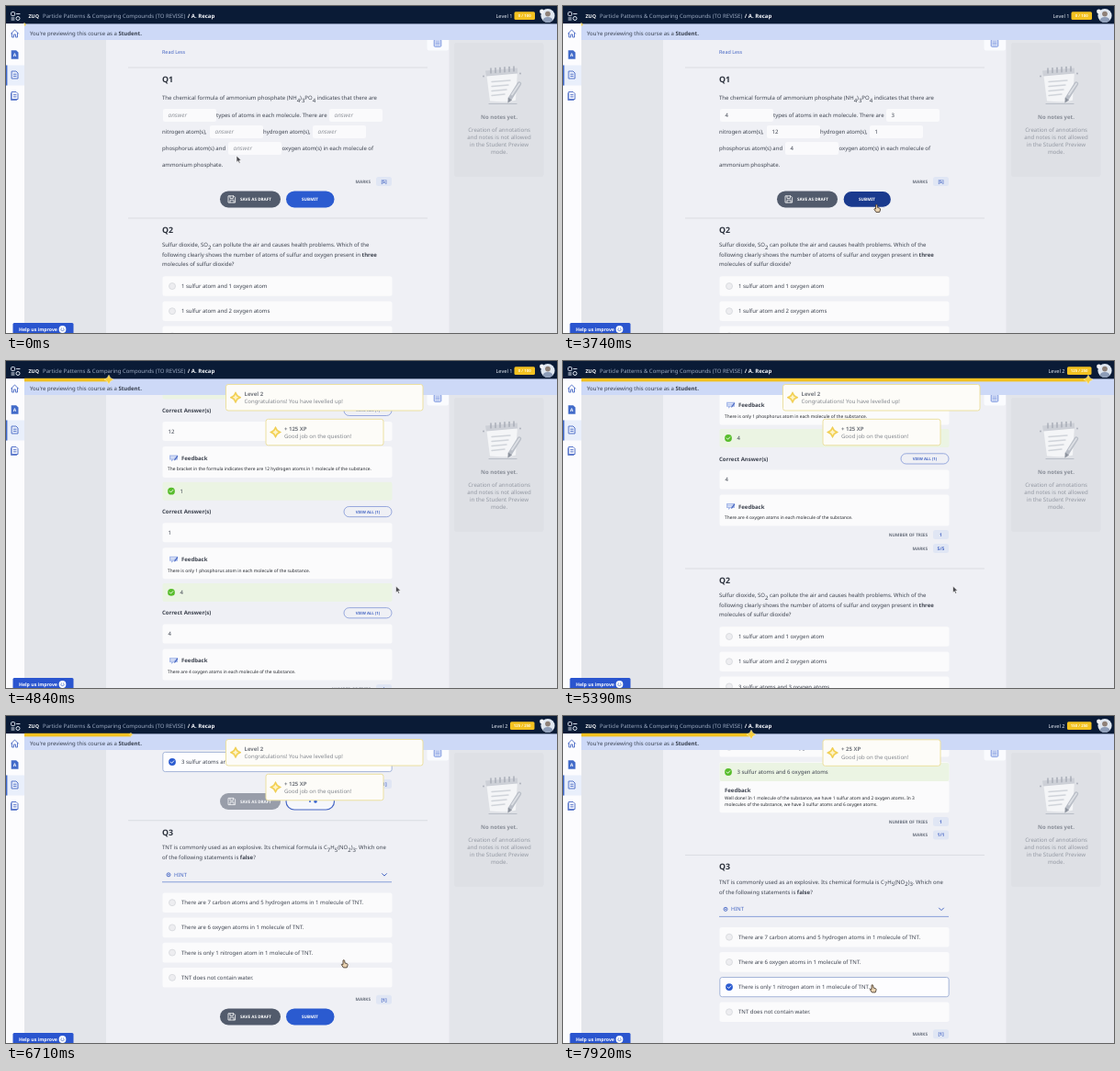
Write an HTML page that moves like this. It is 600 by 356 pixels and loops after 8 s.

```html
<!DOCTYPE html>
<html lang="en">
<head>
<meta charset="utf-8">
<title>Course preview</title>
<style>
html, body { margin: 0; width: 100%; height: 100%; overflow: hidden; background: #e3e5ea; }
svg { display: block; width: 600px; height: 356px; }
text { font-family: "Noto Sans", "Open Sans", sans-serif; text-rendering: geometricPrecision; }
</style>
</head>
<body>
<svg id="stage" viewBox="0 0 600 356" xmlns="http://www.w3.org/2000/svg"></svg>
<script>
const LOOP = 8000, STEP = 110;
const INK = '#3d434f', BLUE = '#2b5bd0', LINK = '#4767c4', GOLD = '#f3c120', PAPER = '#eff0f5';
const stage = document.getElementById('stage');

// ---- drawing helpers: y is the middle of the capitals ----
function markup(s) {
  return s.replace(/&/g, '&amp;')
    .replace(/\*\*(.+?)\*\*/g, '<tspan font-weight="700">$1</tspan>')
    .replace(/_(\d)([^_]*)/g, '<tspan dy="2.4">$1</tspan><tspan dy="-2.4">$2</tspan>');
}
function text(x, y, s, { size = 6, fill = INK, bold, italic, anchor, id } = {}) {
  return `<text x="${x}" y="${(y + size * 0.35).toFixed(2)}" font-size="${size}" fill="${fill}"` +
    (bold ? ' font-weight="700"' : '') + (italic ? ' font-style="italic"' : '') +
    (anchor ? ` text-anchor="${anchor}"` : '') + (id ? ` id="${id}"` : '') + `>${markup(s)}</text>`;
}
const rect = (x, y, w, h, fill, rx = 0, extra = '') =>
  `<rect x="${x}" y="${y}" width="${w}" height="${h}" rx="${rx}" fill="${fill}" ${extra}/>`;
const circle = (x, y, r, fill, extra = '') =>
  `<circle cx="${x}" cy="${y}" r="${r}" fill="${fill}" ${extra}/>`;
const line = (d, stroke, w = 0.8, extra = '') =>
  `<path d="${d}" fill="none" stroke="${stroke}" stroke-width="${w}" stroke-linecap="round" stroke-linejoin="round" ${extra}/>`;
const shape = (d, fill, extra = '') => `<path d="${d}" fill="${fill}" ${extra}/>`;
const group = (id, body) => `<g id="${id}">${body}</g>`;
const at = (x, y, body) => `<g transform="translate(${x} ${y})">${body}</g>`;
const star = (r, fill, extra = '') => {
  const k = r * 0.36;
  return shape(`M0 ${-r}L${k} ${-k}L${r} 0L${k} ${k}L0 ${r}L${-k} ${k}L${-r} 0L${-k} ${-k}Z`, fill, extra);
};

// ---- question parts ----
const divider = y => rect(133, y - 0.4, 326, 0.8, '#d5d8dd');
const heading = (y, s) => text(170, y, s, { size: 8.8, bold: true, fill: '#2c323d' });
const card = (y, h) => rect(170.5, y, 250, h, '#fbfbfc', 2.5);

function score(y, label, value) {
  return text(397, y, label, { size: 4.7, bold: true, fill: '#6a717e', anchor: 'end' }) +
    rect(403, y - 5, 17, 10, '#e0e6f4', 2.5) +
    text(411.5, y, value, { size: 5, bold: true, fill: LINK, anchor: 'middle' });
}
function buttons(y, id) {
  const disk = line('M-3.6 -3.6H2L3.6 -2V3.6H-3.6ZM-2 -3.4V-1H1.4V-3.4M-2 3.4V.8H2V3.4', '#fff', 0.8);
  const dots = [0, 1, 2].map(i => circle(325 + i * 6, y, 1, BLUE, `class="${id}Dot"`)).join('');
  return group(id + 'Save', rect(233, y - 9, 66, 18, '#525b6c', 9) + at(246, y, disk) +
      text(255, y, 'SAVE AS DRAFT', { size: 4.6, bold: true, fill: '#fff' })) +
    rect(305, y - 9, 52.5, 18, BLUE, 9, `id="${id}Pill" stroke-width="1.2"`) +
    text(331, y, 'SUBMIT', { size: 4.6, bold: true, fill: '#fff', anchor: 'middle', id: id + 'Label' }) +
    group(id + 'Dots', dots);
}
function check(x, y, fill) {
  return circle(x, y, 3.9, fill) + line(`M${x - 1.7} ${y}l1.2 1.3l2.3 -2.5`, '#fff', 0.9);
}
function option(y, s, id) {
  const picked = id ? group(id, rect(170.8, y - 10.6, 249.4, 21.2, '#fdfdff', 2.5, 'stroke="#8fa3cf" stroke-width=".8"') +
    check(181, y, BLUE)) : '';
  return card(y - 10.8, 21.6) + circle(181, y, 3.5, '#ededf0', 'stroke="#d2d4d8" stroke-width=".7"') +
    picked + text(191, y, s);
}
const options = (y, list, ids = {}) => list.map((s, i) => option(y + 27.2 * i, s, ids[i])).join('');

// ---- question 1 ----
const blanks = [[171, 119, '4'], [352, 119, '3'], [222, 137, '12'], [334, 137, '1'], [242, 155, '4']];
function questionOne() {
  const copy = [
    [170, 100, 'The chemical formula of ammonium phosphate (NH_4)_3PO_4 indicates that there are'],
    [229, 119, 'types of atoms in each molecule. There are'],
    [170, 137, 'nitrogen atom(s),'], [280, 137, 'hydrogen atom(s),'],
    [170, 155, 'phosphorus atom(s) and'], [300.5, 155, 'oxygen atom(s) in each molecule of'],
    [170, 172.5, 'ammonium phosphate.']
  ];
  return text(170, 50, 'Read Less', { size: 5.4, fill: LINK }) + divider(67) + heading(80, 'Q1') +
    copy.map(c => text(...c)).join('') +
    blanks.map(([x, y], i) => rect(x, y - 7, 58, 14, '#fafafc', 2) +
      text(x + 5.5, y, 'answer', { size: 6.4, id: 'blank' + i })).join('') +
    rect(357.6, 115, 0.7, 8, '#333', 0, 'id="caret"');
}
const feedback = [
  'There are 4 types of atoms in each molecule of the substance.',
  'The bracket in the formula indicates there are 3 nitrogen atoms in 1 molecule of the substance.',
  'The bracket in the formula indicates there are 12 hydrogen atoms in 1 molecule of the substance.',
  'There is only 1 phosphorus atom in each molecule of the substance.',
  'There are 4 oxygen atoms in each molecule of the substance.'
];
const note = (y, s) => text(176, y, s, { size: 4.86, fill: '#24272d' });
const right = y => rect(170.5, y - 10, 250, 20, '#ebf4e3', 2) + check(180, y, '#58bd2c');
function resultRow(remark, i) {
  const answer = blanks[i][2];
  const bubble = shape('M-4.5 -3H4.5V2H0L-2.5 4V2H-4.5Z', '#a9bbea') +
    line('M-2.8 -1.2H2M-2.8 .4H.5', '#fff', 0.7) + line('M1.2 2.2L4.2 -1.8', '#4a68bf', 1.1);
  return at(0, 195 + 110.2 * i, right(0) + text(189.5, 0, answer) +
    text(170, 22.5, 'Correct Answer(s)', { bold: true }) +
    rect(368, 16.8, 52, 11.2, 'none', 5.6, 'stroke="#7088d2" stroke-width=".7"') +
    text(394, 22.4, 'VIEW ALL (1)', { size: 4.3, bold: true, fill: LINK, anchor: 'middle' }) +
    card(34.6, 21) + text(176.5, 45.2, answer) +
    card(61.6, 34) + at(182.5, 74, bubble) + text(191, 74.5, 'Feedback', { bold: true }) +
    note(86.2, remark));
}

// ---- questions 2 and 3, measured from their headings ----
const questionTwo = divider(-13) + heading(0, 'Q2') +
  text(170, 16, 'Sulfur dioxide, SO_2 can pollute the air and causes health problems. Which of the') +
  text(170, 26.4, 'following clearly shows the number of atoms of sulfur and oxygen present in **three**') +
  text(170, 36.8, 'molecules of sulfur dioxide?') +
  options(61, ['1 sulfur atom and 1 oxygen atom', '1 sulfur atom and 2 oxygen atoms',
    '3 sulfur atoms and 3 oxygen atoms', '3 sulfur atoms and 6 oxygen atoms'], { 3: 'pickTwo' }) +
  group('formTwo', score(166.6, 'MARKS', '[1]') + buttons(185.6, 'two')) +
  group('resultTwo', card(152, 34.8) + right(142.6) + text(189.5, 142.6, '3 sulfur atoms and 6 oxygen atoms') +
    text(176, 162.4, 'Feedback', { bold: true }) +
    note(171, 'Well done! In 1 molecule of the substance, we have 1 sulfur atom and 2 oxygen atoms. In 3') +
    note(177.6, 'molecules of the substance, we have 3 sulfur atoms and 6 oxygen atoms.') +
    score(196.6, 'NUMBER OF TRIES', '1') + score(211.2, 'MARKS', '1/1'));

const questionThree = divider(-13) + heading(0, 'Q3') +
  text(170, 16.5, 'TNT is commonly used as an explosive. Its chemical formula is C_7H_5(NO_2)_3. Which one') +
  text(170, 27.4, 'of the following statements is **false**?') +
  circle(177, 46, 2, 'none', `stroke="${LINK}" stroke-width=".9"`) + circle(177, 46, 0.8, LINK) +
  text(183, 46, 'HINT', { size: 5.8, fill: LINK }) + line('M409.5 44.8l2.5 2.5l2.5 -2.5', LINK, 1) +
  rect(170, 53.6, 250, 0.8, '#6f8bd2') +
  options(76.4, ['There are 7 carbon atoms and 5 hydrogen atoms in 1 molecule of TNT.',
    'There are 6 oxygen atoms in 1 molecule of TNT.',
    'There is only 1 nitrogen atom in 1 molecule of TNT.', 'TNT does not contain water.'], { 2: 'pickThree' }) +
  score(182, 'MARKS', '[1]') + buttons(200.6, 'three');

// ---- frame around the page ----
function notesCard() {
  const rings = [-12, -7, -2, 3, 8, 13];
  const pad = shape('M-17 -14L17 -17L15 16Q6 19 -13 17Z', '#f4f5f7') + shape('M-18 -16L17 -19L17 -13L-17 -10Z', '#cdd0d7') +
    rings.map(x => line(`M${x} ${-14.5 - x * 0.08}v-5`, '#a3a8b2', 1.3)).join('') +
    [0, 1, 2, 3].map(i => line(`M-11 ${-4 + i * 5}L${9 - i * 2} ${-5.5 + i * 5}`, '#d0d4da', 1.4)).join('') +
    line('M19 -2L9 14', '#b9bec7', 4.4) + line('M19 -2L11 10', '#dcdfe4', 1.8) + shape('M6.8 13L11 16L6.4 19Z', '#8d939e');
  const specks = circle(-20, -10, 0.9, '#a9aeb8') + circle(20, -13, 0.9, '#a9aeb8') +
    line('M-14 20H16', '#b9bec7', 1.2);
  const lines = ['Creation of annotations', 'and notes is not allowed', 'in the Student Preview', 'mode.'];
  return rect(488, 40, 97.5, 146, '#dee0e5', 3) + at(540, 86.5, specks + pad) +
    text(537, 121, 'No notes yet.', { bold: true, fill: '#8a8f99', anchor: 'middle' }) +
    lines.map((s, i) => text(537, 134.5 + 8 * i, s, { size: 6.1, fill: '#9499a3', anchor: 'middle' })).join('');
}
function sidebar() {
  const sheet = line('M-3 -4H1.5L3.5 -2V4H-3ZM-1.2 -.8H1.6M-1.2 1.4H1.6', LINK, 0.9);
  return rect(0, 19.2, 20, 337, '#fcfcfe') + rect(0, 64.5, 20, 22, '#e9effb') + rect(0, 64.5, 1.4, 22, '#3d66c8') +
    at(9.5, 30, line('M-4 0L0 -4L4 0M-3 -.6V4H-1V1H1V4H3V-.6', LINK, 0.9)) +
    at(9.5, 53, shape('M-3.8 -4.8H1.6L4 -2.4V4.8H-3.8Z', '#426bc9') +
      text(0, 0.6, 'A', { size: 5, bold: true, fill: '#fff', anchor: 'middle' })) +
    at(9.5, 75, sheet) + at(9.5, 97.5, line('M-4 -2.5V5H2', LINK, 0.8) + sheet) +
    rect(7.5, 345, 66, 13, '#2a55cf', 1.5) + text(14, 352, 'Help us improve', { size: 5.2, bold: true, fill: '#fff' }) +
    at(61.5, 352, circle(0, 0, 3.9, '#fff') + circle(-1.3, -1, 0.6, '#2450c2') + circle(1.3, -1, 0.6, '#2450c2') +
      line('M-1.9 .8Q0 2.8 1.9 .8', '#2450c2', 0.7));
}
function header() {
  return rect(20, 19, 580, 18, '#cdd9f7') + text(26, 30, "You're previewing this course as a **Student.**", { fill: '#38404f' }) +
    rect(0, 0, 600, 19.4, '#0a1b36') +
    rect(5.6, 6.6, 4, 4, 'none', 1, 'stroke="#dfe6f2" stroke-width="1"') +
    circle(13, 13.5, 2, 'none', 'stroke="#dfe6f2" stroke-width="1"') +
    line('M11.5 8.6H15M6 13H9M6 15H9', '#dfe6f2', 1) +
    text(24.5, 11.3, 'ZUQ', { size: 5.4, bold: true, fill: '#fff' }) +
    text(40, 10.8, 'Particle Patterns & Comparing Compounds (TO REVISE)', { fill: '#9caac1' }) +
    text(197.8, 10.8, '/ A. Recap', { bold: true, fill: '#f4f6fa' }) +
    text(552, 10.8, '', { size: 5.6, fill: '#dfe5ef', anchor: 'end', id: 'level' }) +
    rect(553, 6.3, 23, 8.8, GOLD, 1.5, 'id="xpBox"') +
    text(564.5, 10.7, '', { size: 4.3, bold: true, fill: '#fff6d8', anchor: 'middle', id: 'xp' }) +
    circle(590, 10.5, 7.6, '#dfe7f1') + circle(590, 8.6, 2.9, '#8e8178') +
    shape('M584.6 15.8Q585 12 590 12T595.4 15.8Q590 20.4 584.6 15.8Z', '#8d9db8') + circle(583.5, 6, 2.4, '#f2f4f8') +
    rect(20, 18.8, 0, 3.6, GOLD, 0, 'id="bar"') + group('barStar', star(5, '#f8cf3e', 'stroke="#fff3c0" stroke-width=".5"'));
}
function toast(id, x, y, w, title, body) {
  return group(id, rect(x, y, w, 28.5, '#fdfcf8', 2.5, 'stroke="#ece0a0" stroke-width="1"') +
    at(x + 10.5, y + 14.2, star(6, '#f5d250', 'stroke="#eac64a" stroke-width=".6"') + star(3.2, '#fdf3c8')) +
    text(x + 20, y + 10.3, title, { bold: true, fill: '#73777e' }) +
    text(x + 20, y + 18.6, body, { fill: '#84888f' }));
}
const cursors =
  group('arrow', shape('M0 0V7.2L1.7 5.7L2.9 8.3L4.1 7.7L3 5.2L5.2 5Z', '#4a4a4f', 'stroke="#fff" stroke-width=".6"')) +
  group('beam', line('M-1.5 -3.5H1.5M0 -3.5V3.5M-1.5 3.5H1.5', '#222', 0.8)) +
  group('hand', shape('M-1 -3.5Q0 -4.4 .7 -3.3L1 -.6L3.4 .1Q4.3 .6 4 2L3.2 4.4H-.6L-2.7 1.2Q-2.6 .1 -1 1Z',
    '#e9d3b2', 'stroke="#3a2c20" stroke-width=".8"'));

stage.innerHTML = rect(0, 0, 600, 356, '#e3e5ea') + rect(109, 21, 373.5, 335, PAPER) +
  group('page', questionOne() +
    group('formOne', score(191, 'MARKS', '[5]') + buttons(210.4, 'one')) +
    group('resultOne', feedback.map(resultRow).join('') +
      score(740.8, 'NUMBER OF TRIES', '1') + score(755.8, 'MARKS', '5/5')) +
    group('qTwo', questionTwo) + group('qThree', questionThree)) +
  notesCard() + rect(458.5, 32, 23.5, 16.5, '#fafbfe', 2.5) +
  at(470, 40.5, rect(-3.8, -3.8, 7.6, 7.6, '#dfe6f8', 1, 'stroke="#6d8bdc" stroke-width=".9"') +
    line('M-2 -1.6H2M-2 0H2M-2 1.6H2', '#7f99e0', 0.7)) +
  header() + sidebar() +
  toast('levelToast', 239.5, 25.5, 214.5, 'Level 2', 'Congratulations! You have levelled up!') +
  toast('xpToast', 283, 63.3, 128, '+ 125 XP', 'Good job on the question!') +
  toast('bonusToast', 283, 25.8, 128, '+ 25 XP', 'Good job on the question!') +
  group('cursor', cursors);

// ---- motion ----
const el = {};
stage.querySelectorAll('[id]').forEach(n => { el[n.id] = n; });
const set = (id, attrs) => { for (const k in attrs) el[id].setAttribute(k, attrs[k]); };
const show = (id, on) => set(id, { display: on ? 'inline' : 'none' });
const move = (id, x, y, s = 1) => set(id, { transform: `translate(${x} ${y}) scale(${s})` });
const ease = u => u * u * (3 - 2 * u);
const linear = u => u;

// keys are [time, value, value...]
function track(keys, t, curve = ease) {
  const i = keys.findIndex(k => k[0] > t);
  if (i < 0) return keys[keys.length - 1].slice(1);
  if (i === 0) return keys[0].slice(1);
  const a = keys[i - 1], b = keys[i], u = curve((t - a[0]) / (b[0] - a[0]));
  return a.slice(1).map((v, j) => v + (b[j + 1] - v) * u);
}
const pointer = [[220, 251, 163], [770, 202, 118], [1210, 202, 118], [1760, 372, 117], [2090, 372, 117],
  [2310, 252, 136], [2530, 252, 136], [2750, 366, 136], [2970, 366, 136], [3190, 272, 155],
  [3300, 272, 155], [3630, 341.5, 220], [3850, 341.5, 220], [4180, 424.5, 245], [5500, 424.5, 245],
  [5830, 252, 231], [5940, 252, 231], [6270, 338, 272], [6380, 338, 272], [6710, 368, 269.5],
  [7040, 368, 269.5], [7480, 337, 296.5]];
const scroll = [[4180, 0], [4510, 258], [5280, 551.8], [5500, 551.8], [5830, 703], [6380, 703],
  [6600, 883.4], [6930, 883.4], [7040, 872.4]];
const fill = [[4730, 20], [5390, 572], [5450, 600], [5460, 20], [5940, 136], [7040, 136], [7700, 205]];
const typed = [1210, 2090, 2420, 2860, 3300], clicked = [770, 1760, 2310, 2750, 3190];

function button(id, t, press, load, end) {
  const busy = t >= load && t < end, down = t >= press && t < load;
  set(id + 'Pill', { fill: busy ? '#f6f7fc' : down ? '#1a3a8e' : BLUE, stroke: busy ? LINK : down ? PAPER : 'none' });
  set(id + 'Save', { opacity: busy ? 0.55 : 1 });
  show(id + 'Label', !busy);
  show(id + 'Dots', busy);
  stage.querySelectorAll(`.${id}Dot`).forEach((d, i) => {
    const k = Math.max(0, Math.cos((t - 6710) / 140 + 2 - i));
    d.setAttribute('r', (1.8 * k).toFixed(2));
  });
}

function draw(t) {
  blanks.forEach(([, , answer], i) => {
    const done = t >= typed[i];
    el['blank' + i].textContent = !done ? 'answer' : i === 2 && t < typed[i] + STEP ? '1' : answer;
    set('blank' + i, { fill: done ? INK : '#92969d', 'font-style': done ? 'normal' : 'italic', 'font-size': done ? 6 : 6.4 });
  });
  const focus = clicked.findIndex((c, i) => t >= c && t < typed[i]);
  show('caret', focus >= 0);
  if (focus >= 0) set('caret', { x: blanks[focus][0] + 5.6, y: blanks[focus][1] - 4 });

  const oneDone = t >= 4180, twoDone = t >= 6930;
  button('one', t, 3630, 3850, 4180);
  button('two', t, 6160, 6380, 6930);
  button('three', t, LOOP, LOOP, LOOP);
  show('formOne', !oneDone);
  show('resultOne', oneDone);
  show('formTwo', !twoDone);
  show('resultTwo', twoDone);
  show('pickTwo', t >= 5940 && !twoDone);
  show('pickThree', t >= 7590);

  const two = oneDone ? 790.8 : 244;
  move('page', 0, -track(scroll, t, linear)[0]);
  move('qTwo', 0, two);
  move('qThree', 0, two + (twoDone ? 245.9 : 219.4));

  show('levelToast', t >= 4290 && t < 6820);
  show('xpToast', t >= 4290 && t < 6820);
  show('bonusToast', t >= 7040);

  const up = t >= 4950, end = track(fill, t, linear)[0];
  el.level.textContent = up ? 'Level 2' : 'Level 1';
  el.xp.textContent = !up ? '0 / 100' : t < 7040 ? '125 / 250' : '150 / 250';
  set('level', { x: up ? 546.5 : 551.5 });
  set('xpBox', { x: up ? 549 : 553.5, width: up ? 26.5 : 22.5 });
  set('xp', { x: up ? 562.2 : 564.7 });
  set('bar', { width: end - 20 });
  const growing = (t > 4730 && t < 5940) || t > 7040;
  move('barStar', end, 20.2, growing ? 1 : 0.45);

  const [x, y] = track(pointer, t);
  const beam = t >= 660 && t < 3410;
  const hand = (t >= 3410 && t < 3960) || t >= 5720;
  move('cursor', x, y);
  show('beam', beam);
  show('hand', hand);
  show('arrow', !beam && !hand);
}

const start = performance.now();
function tick(now) {
  const t = Math.max(0, now - start) % LOOP;
  draw(Math.floor(t / STEP) * STEP);
  requestAnimationFrame(tick);
}
draw(0);
requestAnimationFrame(tick);
</script>
</body>
</html>
```
